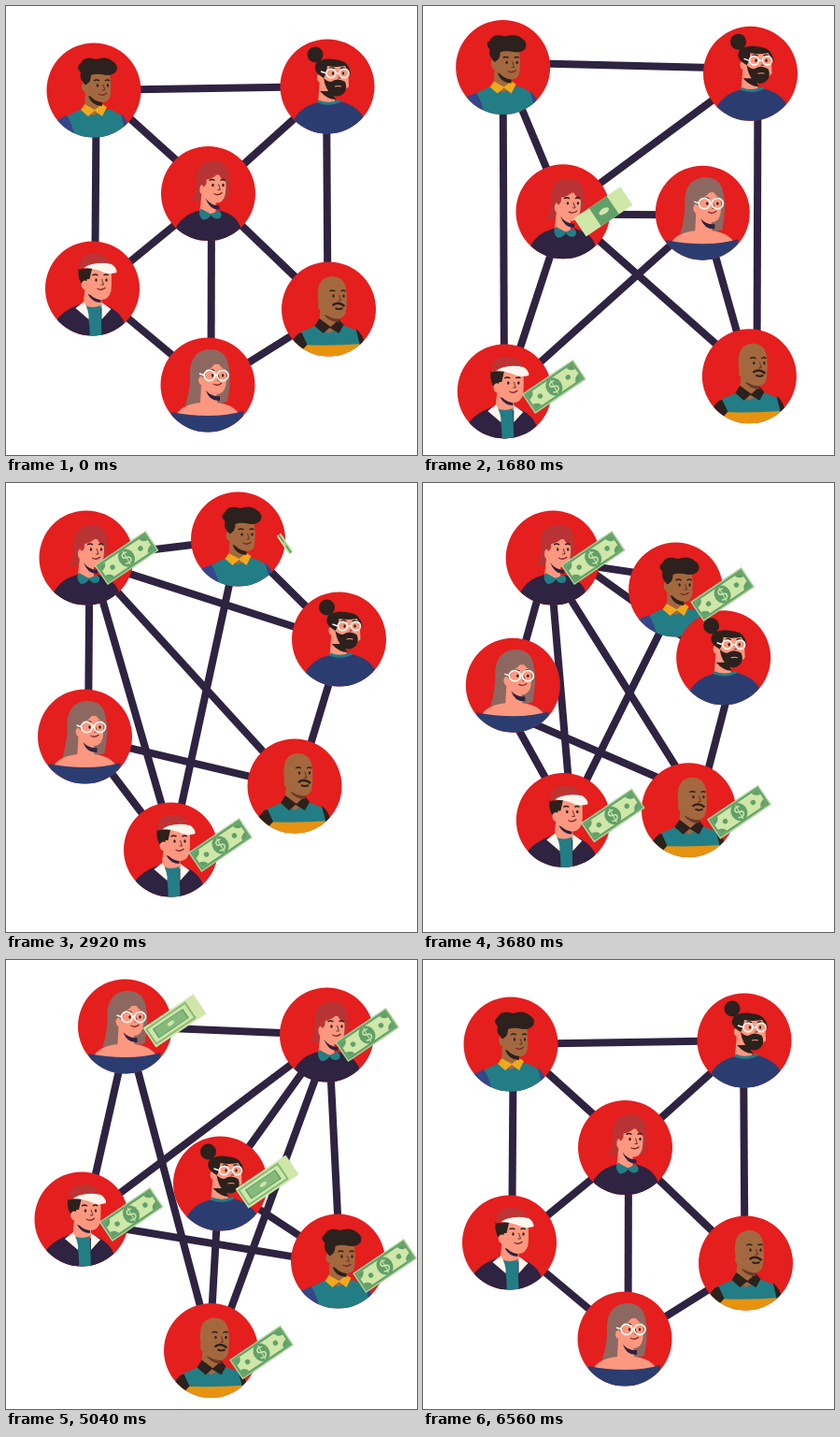
Write an HTML page with a canvas that moves like this. It is 440 px wide and 480 px high and loops after 6600 ms.

```html
<!DOCTYPE html>
<html lang="en">
<head>
<meta charset="utf-8">
<title>Payment network</title>
<style>
html, body { margin: 0; width: 100%; height: 100%; overflow: hidden; background: #fff; }
canvas { display: block; }
</style>
</head>
<body>
<canvas id="stage" width="440" height="480"></canvas>
<script>
const ctx = document.getElementById('stage').getContext('2d');
const LOOP = 6600, R = 50.5;
const RED = '#e51e1e', INK = '#2e2340', TEAL = '#237d85', BLUE = '#2b3d70';
const PINK = '#fc9880', BROWN = '#a4683f', HAIR = '#2c211c', CREAM = '#fdf6ee';
const PALE = '#cfe7a8', GREEN = '#62a069', MID = '#86ba7c';

// Start and duration of each move between layouts
const moves = [[60, 1200], [1654, 1190], [3277, 1320], [5040, 1120]];

// Four layouts per person; pace above 1 trails behind; bill = offset and time it appears
const people = {
  A: { at: [[94, 90], [85.5, 65.5], [248.5, 60], [355.5, 322]], pace: 1.22, bill: [50, 5, 2912] },
  B: { at: [[344, 86], [350.5, 72], [356.5, 167], [229.5, 239]], pace: 1, bill: [50, -2, 4840] },
  C: { at: [[216.5, 200.5], [150, 220], [86, 80], [343.5, 80]], pace: 1.22, bill: [43, 0, 1560] },
  D: { at: [[92.5, 302], [87, 412], [176.5, 392], [81, 277]], pace: 1, bill: [53, -5, 1300] },
  E: { at: [[216, 405], [300, 221], [84.5, 271], [127.5, 71]], pace: 1, bill: [53, -6, 4840] },
  F: { at: [[345.5, 324], [349.5, 396], [309, 324], [219.5, 417.5]], pace: 1, bill: [54, 2, 2960] }
};

// Links with their sideways shift in each layout
const LINK_PACE = 1.4;
const links = {
  AB: [0, -5, 0, 0], AC: [-3.5, -1.5, 0, 2], AD: [-2.7, 0, -1, -3],
  BC: [-2, 1, -2, 2], BF: [1, -8, -3.4, 1.5], CD: [-3.4, -1.6, -4, -2.4],
  CE: [-3.5, 2.5, -3.5, 0], CF: [0, -2.3, 0, -4.6], DE: [0, 2.5, -1, 4],
  EF: [3, 0, 1, -1]
};

const ease = x => { const y = x ** 0.9; return y * y * (3 - 2 * y); };
const mix = (a, b, p) => a + (b - a) * p;

function phase(t, pace) {
  let k = 0;
  while (k < 3 && t >= moves[k + 1][0]) k++;
  const x = (t - moves[k][0]) / moves[k][1];
  return { from: k, to: (k + 1) % 4, p: ease(Math.min(1, Math.max(0, x))) ** pace };
}

function place(id, t) {
  const { at, pace } = people[id], { from, to, p } = phase(t, pace);
  return [0, 1].map(i => mix(at[from][i], at[to][i], p));
}

function fill(color, d) {
  ctx.fillStyle = color;
  ctx.fill(new Path2D(d));
}

function line(color, width, d) {
  ctx.strokeStyle = color;
  ctx.lineWidth = width;
  ctx.stroke(new Path2D(d));
}

function disc(color, x, y, rx, ry = rx) {
  ctx.fillStyle = color;
  ctx.beginPath();
  ctx.ellipse(x, y, rx, ry, 0, 0, 7);
  ctx.fill();
}

// Eyes, brows, nose and mouth around the nose position
function features(x, y, mouth = true) {
  disc(HAIR, x - 5, y - 3, 1.2, 1.7);
  disc(HAIR, x + 6, y - 3, 1.2, 1.7);
  line(HAIR, 1.5, `M${x - 9} ${y - 8}q3 -2 6 0M${x + 3} ${y - 8}q3 -2 5 0`);
  line('#5b2b25', 0.9, `M${x + 1} ${y - 4}l2 6h-3`);
  if (mouth) line('#7c2527', 1.3, `M${x - 4} ${y + 6}q5 3 9 -1`);
}

function glasses(x, y, r) {
  ctx.strokeStyle = CREAM;
  ctx.lineWidth = 1.7;
  for (const dx of [-7, 7]) {
    ctx.beginPath();
    ctx.ellipse(x + dx, y, r, r - 0.4, 0, 0, 7);
    ctx.stroke();
  }
  line(CREAM, 1.4, `M${x - 2} ${y}h4M${x - 12} ${y}l-6 -2`);
}

const portraits = {
  A() {
    fill(BROWN, 'M-9 0L9 3V22L0 28L-10 20Z');
    fill(TEAL, 'M-38 33Q-24 25 -13 20L0 27L15 20Q30 24 33 33L36 52H-38Z');
    fill('#36468a', 'M-40 32L-29 27Q-22 37 -20 52H-42ZM29 25Q37 32 38 45L33 42Z');
    fill('#f0a91f', 'M-10 15L-14 21L-6 28L1 22L9 28L14 18L9 15L1 21Z');
    fill(HAIR, 'M-6 6Q-2 17 9 17V10Z');
    fill(BROWN, 'M-7 -20H17Q19 -8 18 4Q17 13 9 13Q-1 12 -6 3Q-13 3 -13 -5Q-11 -11 -7 -8Z');
    fill(HAIR, 'M-7 -7Q-9 -4 -11 -8Q-16 -13 -14 -19Q-20 -25 -14 -29Q-10 -37 2 -33Q14 -37 20 -31Q27 -27 24 -20Q19 -14 8 -17Q1 -18 -3 -16Q-3 -9 -7 -7Z');
    features(9, -2);
  },
  B() {
    fill(PINK, 'M-8 -8L8 6V18H-10Z');
    fill(BLUE, 'M-38 40Q-31 22 -10 17Q3 22 14 16Q35 21 41 38V52H-38Z');
    line(TEAL, 3, 'M-10 16Q3 21 14 15');
    fill(HAIR, 'M-8 5Q0 14 9 14L5 5Z');
    disc(HAIR, -13, -34, 8.5);
    fill(PINK, 'M-7 -23H22L23 0Q12 12 0 4L-4 -4Q-12 -3 -11 -11Q-9 -15 -6 -12Z');
    fill(HAIR, 'M-7 -11Q-17 -18 -11 -26Q-2 -32 13 -28Q24 -26 25 -12Q22 -17 19 -22Q8 -20 0 -22Q-1 -13 -4 -9Z');
    fill(HAIR, 'M-4 -9Q0 -5 4 -5Q11 -10 19 -5Q22 2 18 7Q12 13 5 9Q-2 4 -4 -9Z');
    line(PINK, 1.1, 'M8 0q4 -1 7 0');
    features(11, -11, false);
    glasses(11, -14, 5);
  },
  C() {
    fill('#b83434', 'M-18 8Q-12 0 -13 -16Q-13 -33 3 -35Q20 -37 22 -21Q24 -9 22 4Q16 10 6 7Z');
    fill(PINK, 'M-7 0L8 5V23L0 28L-9 18Z');
    fill(INK, 'M-35 37Q-27 22 -9 18Q0 26 12 18Q31 23 35 37V52H-35Z');
    fill(TEAL, 'M-8 16Q-12 22 -6 28Q0 28 3 23Q7 29 13 26Q16 21 11 18L3 22Z');
    fill(INK, 'M-3 5Q3 13 12 13V17Q2 18 -3 5Z');
    fill(PINK, 'M-5 -20H18Q20 -9 18 2Q15 11 8 10Q0 8 -4 2Q-10 1 -9 -6Q-8 -11 -5 -9Z');
    fill('#b83434', 'M-5 -7Q-14 -19 -5 -28Q9 -36 19 -25Q22 -18 20 -12Q13 -15 11 -22Q4 -15 -2 -15Q-1 -10 -5 -7Z');
    features(10, -6);
  },
  D() {
    fill(PINK, 'M-8 0L9 4V24L0 29L-10 22Z');
    fill(INK, 'M-40 36Q-33 24 -14 17L0 27L14 18Q31 25 35 39V52H-40Z');
    fill(PINK, 'M-9 8H10V20H-9Z');
    fill(TEAL, 'M-8 18Q0 22 9 18L10 52H-3Q-2 34 -8 18Z');
    fill(CREAM, 'M-9 14L-18 21L-4 33Q-3 25 -9 14ZM10 15L20 22L10 33Z');
    fill(INK, 'M-5 6Q0 15 9 15V10Z');
    fill(HAIR, 'M-15 -21H-2L-3 -7L-9 -2Q-16 -8 -15 -21Z');
    fill(PINK, 'M-5 -22H20Q21 -8 20 3Q17 13 8 12Q-2 10 -5 2Q-12 2 -12 -5Q-10 -10 -6 -8Z');
    fill(HAIR, 'M-6 -23H0L-3 -10H-7Z');
    fill(CREAM, 'M-9 -22Q2 -31 17 -28Q27 -23 26 -17Q16 -14 8 -19Q-1 -22 -9 -22Z');
    fill('#bd3434', 'M-14 -20Q-15 -35 -2 -37Q15 -39 20 -26Q2 -30 -14 -20Z');
    features(9, -6);
  },
  E() {
    fill('#8c6860', 'M-24 22Q-18 3 -19 -15Q-18 -35 0 -38Q19 -39 22 -22Q26 -7 21 18Q10 22 -8 19Q-15 23 -24 22Z');
    fill(PINK, 'M-7 0L9 4L10 19Q29 21 34 33Q0 38 -34 33Q-29 21 -8 19Z');
    fill(BLUE, 'M-39 29Q-20 33 0 33Q22 33 38 28V52H-39Z');
    fill(INK, 'M-2 6Q4 13 13 12V17Q2 18 -2 6Z');
    fill(PINK, 'M-5 -22H18Q21 -8 19 2Q16 11 8 10Q0 8 -4 1Q-10 1 -10 -6Q-8 -11 -5 -9Z');
    fill('#8c6860', 'M-5 -7Q-15 -21 -4 -30Q14 -36 21 -15Q13 -18 10 -26Q4 -16 -2 -16Q-1 -10 -5 -7Z');
    features(10, -7);
    glasses(9, -10, 6);
  },
  F() {
    fill(BROWN, 'M-9 0L10 5V22L0 28L-11 18Z');
    fill(TEAL, 'M-31 25L-12 17L0 26L15 17L32 24L36 43H-31Z');
    fill('#e7930f', 'M-34 38Q0 40 38 37V52H-34Z');
    fill(HAIR, 'M-40 36Q-35 26 -29 25L-23 38L-34 50ZM29 21Q37 27 39 39L34 41Z');
    fill(HAIR, 'M-10 10L-15 18L-6 26L1 20L11 26L16 17L11 11L2 19Z');
    fill('#693b27', 'M-5 6Q1 14 11 14V10Z');
    fill(BROWN, 'M-11 -7Q-15 -34 3 -35Q18 -35 19 -18Q20 -5 18 4Q15 12 6 10Q-3 8 -6 1Q-13 2 -11 -7Z');
    features(10, -11, false);
    line(HAIR, 2.4, 'M4 -4Q10 -9 17 -3');
    line(HAIR, 2, 'M7 -1q4 2 8 0');
  }
};

// Centre, angle and length of a link in one layout
function linkPose(id, k) {
  const [x1, y1] = people[id[0]].at[k], [x2, y2] = people[id[1]].at[k];
  const angle = Math.atan2(y2 - y1, x2 - x1), shift = links[id][k];
  return {
    x: (x1 + x2) / 2 - Math.sin(angle) * shift,
    y: (y1 + y2) / 2 + Math.cos(angle) * shift,
    angle,
    size: Math.hypot(x2 - x1, y2 - y1)
  };
}

// Shorter way round; a near reversal counts as the same bar flipped
function turn(a, b) {
  const d = Math.atan2(Math.sin(b - a), Math.cos(b - a));
  return Math.abs(d) > Math.PI * 2 / 3 ? d - Math.sign(d) * Math.PI : d;
}

function drawLink(id, t) {
  const { from, to, p } = phase(t, LINK_PACE);
  const a = linkPose(id, from), b = linkPose(id, to);
  const size = mix(a.size, b.size, p) - 60;
  ctx.save();
  ctx.translate(mix(a.x, b.x, p), mix(a.y, b.y, p));
  ctx.rotate(a.angle + turn(a.angle, b.angle) * p);
  box(INK, size, 8);
  ctx.restore();
}

function drawPerson(id, t) {
  ctx.save();
  ctx.translate(...place(id, t));
  ctx.beginPath();
  ctx.arc(0, 0, R, 0, 7);
  ctx.fillStyle = RED;
  ctx.fill();
  ctx.clip();
  portraits[id]();
  ctx.restore();
}

function box(color, w, h, x = 0) {
  ctx.fillStyle = color;
  ctx.fillRect(x - w / 2, -h / 2, w, h);
}

function fullBill() {
  box('#a9d196', 66, 25.4);
  box(GREEN, 63, 22.4);
  box(PALE, 59, 18.4);
  for (const sx of [-1, 1]) {
    for (const sy of [-1, 1]) {
      ctx.save();
      ctx.scale(sx, sy);
      fill(GREEN, 'M29.5 9.2H22Q23 4 29.5 3Z');
      ctx.restore();
    }
    disc(GREEN, sx * 18, 0, 2.7);
  }
  disc(GREEN, 0, 0, 8.6, 10);
  ctx.fillStyle = PALE;
  ctx.font = '18px Lato, Arial, sans-serif';
  ctx.textAlign = 'center';
  ctx.textBaseline = 'middle';
  ctx.fillText('$', 0, 1);
}

function strapBill() {
  box(PALE, 60, 23.5);
  box(GREEN, 23, 23.5, 1);
  disc(PALE, 1, 0, 6, 3);
}

function slidingBill() {
  box(PALE, 65, 25);
  box(MID, 52, 21, -5);
  box(PALE, 48, 17, -5);
  box(GREEN, 39, 12, -5);
  box(MID, 36, 10, -5);
  disc(PALE, -5, 0, 4, 2);
}

function drawBill(id, t) {
  const [dx, dy, start] = people[id].bill, age = t - start;
  const size = Math.min(1, age / 100, (6400 - t) / 160);
  if (size <= 0) return;
  const [x, y] = place(id, t);
  ctx.save();
  ctx.translate(x + dx, y + dy);
  ctx.rotate(-34 * Math.PI / 180);
  ctx.scale(size, 1);
  if (age < 180) strapBill();
  else if (age < 300) slidingBill();
  else fullBill();
  ctx.restore();
}

function draw(t) {
  ctx.fillStyle = '#fff';
  ctx.fillRect(0, 0, 440, 480);
  for (const id in links) drawLink(id, t);
  for (const id of 'AEDFBC') drawPerson(id, t);
  for (const id of 'AEDFBC') drawBill(id, t);
}

const begin = performance.now();
function tick(now) {
  draw(Math.max(0, now - begin) % LOOP);
  requestAnimationFrame(tick);
}
draw(0);
requestAnimationFrame(tick);
</script>
</body>
</html>
```
